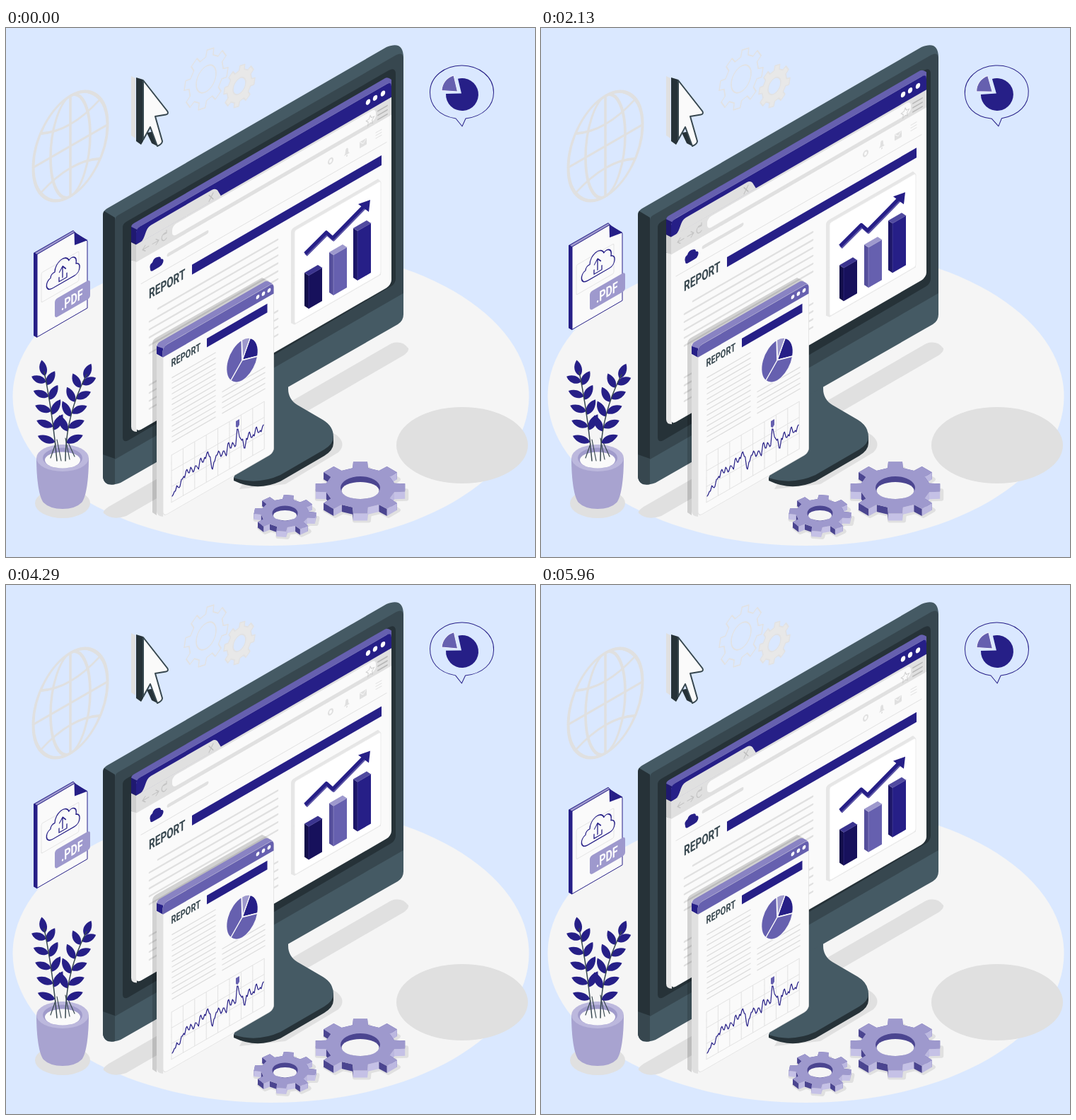
Recreate the animation shown at these times as an HTML page. Size 748 by 748 pixels, loop 6 s.

```html
<!DOCTYPE html>
<html lang="en">
<head>
<meta charset="utf-8">
<title>Report dashboard</title>
<style>
html, body { margin: 0; height: 100%; overflow: hidden; background: #dae8ff; }
svg { display: block; width: 100vw; height: 100vh; }
text { font-family: Roboto, "Liberation Sans", sans-serif; font-weight: 600; }
</style>
</head>
<body>
<svg id="stage" viewBox="0 0 748 748"></svg>
<script>
const NAVY = '#261f87', MID = '#6660af', PALE = '#9e99cd', GREY = '#e0e0e0';
const DARK = '#263238', SLATE = '#37474f', STEEL = '#455a64', WHITE = '#fafafa';

const path = (d, fill, more = '') => `<path d="${d}" fill="${fill}" ${more}/>`;
const line = (d, stroke, w, more = '') =>
  path(d, 'none', `stroke="${stroke}" stroke-width="${w}" stroke-linecap="round" stroke-linejoin="round" ${more}`);
const oval = (x, y, rx, ry, fill, more = '') =>
  `<ellipse cx="${x}" cy="${y}" rx="${rx}" ry="${ry}" fill="${fill}" ${more}/>`;
const rect = (x, y, w, h, fill, r = 0, more = '') =>
  `<rect x="${x}" y="${y}" width="${w}" height="${h}" rx="${r}" fill="${fill}" ${more}/>`;
const group = (transform, body, id = '') => `<g id="${id}" transform="${transform}">${body}</g>`;
const iso = body => group('skewY(-30)', body);
const label = (x, y, size, sx, fill, s) =>
  group(`translate(${x} ${y}) scale(${sx} 1)`, `<text font-size="${size}" fill="${fill}">${s}</text>`);
const range = (n, f) => Array.from({ length: n }, (_, i) => f(i)).join('');

// Outline of an eight-toothed cogwheel as points around the origin
function cog(rx, ry, depth, phase) {
  const pts = [];
  for (let i = 0; i < 8; i++)
    for (const [o, k] of [[-.28, depth], [-.2, 1], [.2, 1], [.28, depth]]) {
      const a = (i + o) / 8 * 2 * Math.PI + phase;
      pts.push([Math.cos(a) * rx * k, Math.sin(a) * ry * k]);
    }
  return pts;
}
const poly = pts => 'M' + pts.map(p => p.map(v => v.toFixed(1))).join('L') + 'Z';

function solidCog(x, y, rx, ry, phase, hx, hy, h) {
  const pts = cog(rx, ry, .77, phase);
  const sides = pts.map((p, i) => {
    const q = pts[(i + 1) % pts.length], dx = q[0] - p[0], dy = q[1] - p[1];
    const fill = dx > 0 ? MID : dy * 1.2 > -dx * .5 ? '#bcb8e0' : dy < -2 ? '#4b4590' : '#c5c1e6';
    return { d: poly([p, q, [q[0], q[1] + h], [p[0], p[1] + h]]), fill, z: p[1] + q[1] };
  }).sort((a, b) => a.z - b.z).map(s => path(s.d, s.fill)).join('');
  return group(`translate(${x} ${y})`,
    group(`translate(2 ${h})`, path(poly(pts), GREY, `stroke="${GREY}" stroke-width="6" stroke-linejoin="round"`)) +
    sides + path(poly(pts), PALE) + oval(0, 0, hx, hy, '#4b4590') +
    oval(0, h * .4, hx - 1.5, hy - h * .4, '#f5f5f5'));
}

function backdrop() {
  const ring = (x, y, rx, ry, hx, hy, fill) => group(`translate(${x} ${y}) skewY(-30)`,
    path(poly(cog(rx, ry, .78, .2)) + `M${-hx} 0a${hx} ${hy} 0 1 0 ${2 * hx} 0a${hx} ${hy} 0 1 0 ${-2 * hx} 0Z`,
      fill, 'fill-rule="evenodd" stroke="#e2e2e3" stroke-width="1.6" stroke-linejoin="round"'));
  return oval(374.5, 521, 365, 211, '#f5f5f5') + oval(645, 590, 93, 54, GREY) +
    group('translate(91 167) skewY(-30)',
      oval(0, 0, 52.5, 71, 'none', `stroke="${GREY}" stroke-width="4"`) +
      oval(0, 0, 28, 71, 'none', `stroke="${GREY}" stroke-width="3.6"`) +
      line('M0-71V71M-52 0H52M-42-42Q0-20 42-42M-42 42Q0 20 42 42', GREY, 3.6)) +
    ring(283, 72, 31, 40, 14, 18, 'none') + ring(330, 82, 22, 28, 9, 11, '#e8e8e8');
}

function cursor() {
  return path('M177 68L183 71V156L177 152Z', GREY) +
    path('M184 70L194 73V160L191 165L184 160Z', DARK) +
    path('M199 148L206 163L214 167L212 146Z', DARK) +
    path('M194 74L228.500 118Q230 122 226 122.500L211 125L221 160Q221 164 214 167L204 140L194 158Z', WHITE,
      `stroke="${SLATE}" stroke-width="2" stroke-linejoin="round"`);
}

function monitor() {
  return path('M545 446Q560 441 569 453Q570 458 562 463L170 690Q150 697 138 686Q136 683 145 677Z', GREY) +
    path('M400 535L468 576Q482 588 470 600L395 645L330 652Z', GREY) +
    path('M322 636L463 577V587Q463 597 450 605L388 641Q355 656 322 640Z', DARK) +
    path('M370 500H399V510Q399 525 412 533L448 554Q463 563 463 578Q463 588 450 596L388 632Q355 647 322 636Z', STEEL) +
    path('M137 264Q137 258 145 254L538 27Q562 17 562 42V405Q562 414 554 419L162 643Q137 652 137 632Z', STEEL) +
    path('M137 264Q137 261 139 259L154 268V645Q137 647 137 632Z', DARK) +
    path('M137 603L154 609V645Q137 647 137 632Z', SLATE) +
    path('M154 272Q154 268 158 265L552 38Q562 33 562 44V375L154 610Z', SLATE) +
    path('M165 282Q165 277 170 274L541 60Q551 55 551 65V354Q551 361 545 365L173 583Q165 587 165 578Z', DARK);
}

function bar(x, top, bottom, left, front, cap) {
  return path(`M${x} ${top}l6 4V${bottom + 5}l-6-4Z`, left) +
    path(`M${x + 6} ${top + 4}l19-11V${bottom - 6}l-19 11Z`, front) +
    path(`M${x} ${top}l19-11 6 4-19 11Z`, cap) +
    line(`M${x + 6} ${bottom + 4}V${top + 4}l19-11`, cap, .6);
}

function screenWindow() {
  const rows = range(13, i => i > 5 && i < 9 ? '' : `M${i ? 203 : 215} ${521 + 11.2 * i}H384`);
  const cloud = 'M204 459Q202 452 207 451Q209 445 215 448Q219 449 219 453Q224 455 222 460Q221 463 217 463H208Q204 463 204 459Z';
  const front = iso(
    rect(184, 390, 361, 288, WHITE, 7) +
    path('M184 414V396Q184 390 190 390H538Q545 390 545 397V414Z', NAVY) +
    rect(184, 412.5, 361, 25, GREY) +
    path('M190 413C198 411 196 397 205 397H291Q296 397 299 402L304 413Z', GREY) +
    [512, 522, 533].map(x => oval(x, 400.3, 3.2, 3.7, '#fff')).join('') +
    line('M287 402l6 9m0-9l-6 9', '#bdbdbd', 1.2) +
    rect(235, 415.5, 288, 16, WHITE, 6) +
    line('M202 425H193l4-4m-4 4l4 4M207 425h9l-4-4m4 4l-4 4M227 421a4 5 0 1 0 0 7m0-11v4h-4', '#c4c4c4', 1.2) +
    path('M515 421l1.7 4 4 .6-3 3.4.8 5-3.5-2.4-3.5 2.4.8-5-3-3.4 4-.6Z', 'none', 'stroke="#cfcfcf"') +
    line('M526 421h13m-13 6h13m-13 6h13', '#b8b8b8', 1.8) +
    line('M230 453H284', GREY, 5) + line('M191 472H538', GREY, 1) +
    oval(459, 453, 3, 3.6, 'none', `stroke="${GREY}" stroke-width="2"`) +
    path('M478 457q2-2 2-5 0-4 2-4t2 4 2 5Zm3 1h2v2h-2Z', GREY) +
    rect(500, 450, 10, 9, GREY, 1) + line('M501 451l4 4 4-4', '#f5f5f5', 1) +
    line('M523 450h8m-8 4h8m-8 4h8', GREY, 1) +
    path(cloud, NAVY) +
    rect(263, 486.5, 268, 14, NAVY) +
    label(202, 500, 19.5, .7, SLATE, 'REPORT') +
    line(rows, GREY, 2.6) +
    path('M403 521Q403 517 408 517H526L530 523V655H408L403 650Z', '#e6e6e6') +
    rect(408, 522, 122, 132, '#fff', 3, 'stroke="#ebebeb"'));
  return path('M177 282Q177 278 181 276L536 71Q540 69 545 73V80L184 287Z', MID) +
    path('M177 281L185 285V307L177 303Z', '#1f1970') +
    path('M177 303L185 307V332L177 328Z', '#cfcfcf') +
    path('M177 328L185 331V571Q177 571 177 564Z', '#e8e8e8') + front +
    bar(422, 346, 392, '#120d4a', '#17115c', '#3b348f') +
    bar(457, 317, 373, '#554f9c', MID, PALE) +
    bar(491, 283, 352, '#1c1668', NAVY, '#514ba0') +
    group('translate(1 2)', line('M423 319L453 289L462 297L506 252', '#5b54a6', 5, 'style="stroke-linecap:butt"')) +
    line('M423 319L453 289L462 297L507 251', NAVY, 5, 'style="stroke-linecap:butt"') +
    path('M515 243L498 249L513 260Z', NAVY);
}

function popup() {
  const slice = (a, b, fill) => {
    const at = v => [Math.cos(v * Math.PI / 180) * 22.5, 662.5 + Math.sin(v * Math.PI / 180) * 29];
    const p = at(a), q = at(b);
    return path(`M0 662.5L${p}A22.5 29 0 0 1 ${q}Z`, fill, `stroke="${WHITE}" stroke-width="1.6"`);
  };
  const trace = [662,655,647,650,638,634,626,629,621,628,619,622,610,614,607,601,606,622,614,604,
    598,606,598,603,588,594,586,592,567,578,583,594,580,573,579,575,566,572,569,563];
  const graph = 'M' + trace.map((y, i) => {
    const x = 235 + i * 3.28;
    return `${x.toFixed(1)} ${y}L${(x + 1.2).toFixed(1)} ${y + (i % 3 - 1) * 1.8}`;
  }).join('L');
  const left = range(13, i => `M235 ${630 + 7.6 * i}H296`);
  const right = range(5, i => `M306 ${691 + 7.6 * i}H366`);
  const grid = range(9, i => `M${234 + 16.4 * i} 739v67`) + range(4, i => `M234 ${739 + 22.3 * i}h131`);
  return path('M207 447Q207 441 212 438L362 353L372 358L213 447V689L207 685Z', '#000', 'opacity=".16"') +
    path('M213 451Q213 447 217 444L365 359Q370 356 378 363V372L222 462Z', '#8983c3') +
    path('M213 450L222 453V466L213 461Z', NAVY) +
    path('M213 461L222 466V691Q213 690 213 683Z', GREY) +
    iso(rect(222, 579, 156.5, 240, WHITE, 6, 'stroke="#e0e0e0" stroke-width=".8"') +
      path('M222 594V585Q222 579 228 579H372Q378.5 579 378.5 585V594Z', MID) +
      [356, 364, 372].map(x => oval(x, 585.8, 2.4, 2.8, '#fff')).join('') +
      rect(284, 603, 85.5, 12.5, NAVY) +
      label(233.5, 614.5, 15.5, .71, SLATE, 'REPORT') +
      line(left + right, '#dcdcdc', 1.4) + line(grid, '#e2e2e2', 1) +
      group('translate(334 0)', slice(-60, 14, NAVY) + slice(-92, -60, PALE) +
        slice(14, 137, MID) + slice(137, 268, MID))) +
    line(graph, NAVY, 1.2) + path('M325 556L330 553V561L327.5 565L325 564Z', MID);
}

function leaf(x, y, angle, len) {
  return group(`translate(${x} ${y}) rotate(${angle})`,
    path(`M0 0C${len * .25} -8 ${len * .7} -7 ${len} 0C${len * .7} 6 ${len * .25} 7 0 0Z`, NAVY));
}
function branch([x0, y0], [cx, cy], [x1, y1], outer, inner, tip) {
  const at = t => [x0, y0].map((v, i) =>
    v * (1 - t) ** 2 + 2 * t * (1 - t) * [cx, cy][i] + t * t * [x1, y1][i]);
  return range(5, i => {
    const t = .2 + i * .17;
    return leaf(...at(t), outer, 26 - i) + (i ? leaf(...at(t - .04), inner, 27 - i) : '');
  }) + leaf(...at(.95), tip, 23) + line(`M${x0} ${y0}Q${cx} ${cy} ${x1} ${y1}`, SLATE, 1.5);
}
function plant() {
  return oval(80, 672, 39, 21, GREY) +
    path('M43 608C43 640 47 664 53 671Q62 680 80 680Q98 680 107 671C113 664 117 640 117 608Z', '#a8a3d0') +
    oval(80, 608, 37, 19, '#bcb8dd') + oval(80, 608, 28, 14.5, '#a09bcb') +
    oval(80, 611, 25, 11.5, WHITE) +
    line('M63 608L70 588M78 612L72 582M90 610L84 580M97 606L87 584', SLATE, 1.2) +
    branch([72, 612], [66, 545], [54, 486], -160, -60, -102) +
    branch([84, 612], [84, 548], [114, 490], -25, -118, -66);
}

function pdfFile() {
  return path('M39 318L95 286L99 290L44 322V438L39 435Z', NAVY) +
    path('M41 318L95 287L97 289L44 320Z', PALE) +
    path('M44 320L97 289L115 301V396L44 437Z', WHITE, `stroke="${NAVY}" stroke-linejoin="round"`) +
    path('M96.5 289L115.5 300L97 307Z', NAVY) +
    iso(rect(50, 375, 53, 42, 'none', 2, 'stroke="#e4e4e4"') +
      line('M66 406H97C105 406 107 393 99 390C101 379 92 376 89 380C84 367 69 372 69 385C65 384 63 387 63 390C55 391 55 406 66 406Z', NAVY, 1.4) +
      line('M80 399V384M75.5 389L80 383L84.5 389M75 396V402H86V396', NAVY, 1.3) +
      rect(69, 424, 50, 26.5, PALE, 4) +
      label(78, 445, 20, .72, '#fff', '.PDF'));
}

function bubble() {
  return path('M636 128C611 124 599.5 109 599.5 91C599.5 69 620 53 644.5 53S689.5 69 689.5 91C689.5 110 675 125 650 128L645 139Z',
      '#dae8ff', `stroke="${NAVY}" stroke-linejoin="round"`) +
    path('M644 92.5L639 71.8A23 23 0 1 1 622 93Z', NAVY) +
    path('M638.5 90L616 88.5A23 23 0 0 1 633 67Z', MID, 'stroke="#f2f4ff" stroke-width="1"');
}

const $ = id => document.getElementById(id);
$('stage').innerHTML = backdrop() + cursor() + monitor() +
  group('', screenWindow(), 'win') + popup() + plant() +
  solidCog(501, 650, 64, 37, -Math.PI / 2, 28, 16, 10) +
  solidCog(394.5, 686, 44, 26, -1.45, 18, 10.5, 8) +
  group('', pdfFile(), 'pdf') + group('', bubble(), 'bubble');

const start = performance.now();
function frame() {
  const t = (performance.now() - start) % 6000;
  const lift = 15 * (1 - Math.abs(t / 3000 - 1));
  const p = t % 3000 / 750;
  const sway = 3 * (p < 1 ? p : p < 3 ? 2 - p : p - 4);
  for (const id of ['win', 'pdf']) $(id).setAttribute('transform', `translate(0 ${-lift})`);
  $('bubble').setAttribute('transform', `rotate(${sway} 644.5 96)`);
  requestAnimationFrame(frame);
}
frame();
</script>
</body>
</html>
```
